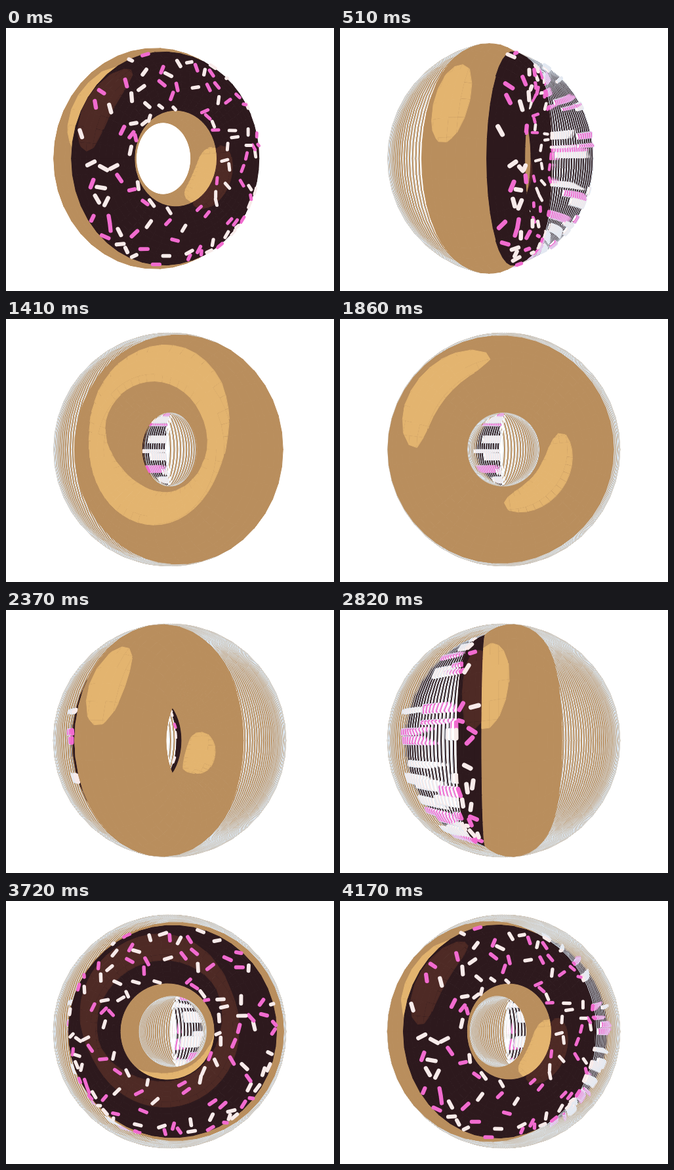
Animation, 500 px wide and 400 px high, one loop 4230 ms. Source, as an HTML page with a canvas:

```html
<!DOCTYPE html>
<html lang="en">
<head>
<meta charset="utf-8">
<title>Spinning donut</title>
<style>
html, body { margin: 0; width: 100%; height: 100%; overflow: hidden; background: #fff; }
canvas { display: block; }
</style>
</head>
<body>
<canvas id="stage" width="500" height="400"></canvas>
<script>
const W = 500, H = 400, CX = 249.5, CY = 198.5, CAM = 483;
const FRAMES = 140, STEP = 30, LOOP = 4230, START = 29.6;
const RING = 111, BACK = 10, LIGHT = [-130, 142, 302], LIT = 0.846;
const DOUGH = { r: 55, z: 0, from: 48.5, to: 311.5, rows: 24, base: '#b98e5d', lit: '#e3b46f' };
const ICING = { r: 43.2, z: 24, from: -73, to: 73, rows: 14, base: '#2d191d', lit: '#4e2a25' };
const SEGMENTS = 48, HALO = '#dce9f5';
const SPRINKLES = 120, GAP = 10, WHITE = '#f8ebea', PINK = '#f16bcf';

const rad = d => d * Math.PI / 180;
const angleAt = k => rad(START + k * 360 / FRAMES);
const dot = (a, b) => a[0] * b[0] + a[1] * b[1] + a[2] * b[2];
const along = (a, b, s) => a.map((v, i) => v + b[i] * s);
const unit = v => along([0, 0, 0], v, 1 / Math.hypot(...v));
function turn([x, y, z], a) {
  const c = Math.cos(a), s = Math.sin(a);
  return [x * c + z * s, y, z * c - x * s];
}
function project([x, y, z]) {
  const s = CAM / (CAM - z);
  return [CX + x * s, CY - y * s, s];
}
const toEye = p => [-p[0], -p[1], CAM - p[2]];

// Point and normal at angle f around the ring and t around the tube
function surface(part, f, t) {
  const out = Math.sin(t);
  const n = [out * Math.cos(f), out * Math.sin(f), Math.cos(t)];
  const core = [RING * Math.cos(f), RING * Math.sin(f), part.z - BACK];
  return { n, p: along(core, n, part.r) };
}

// The donut is a dough arc closed by an icing arc, turned around the axis
function buildPart(part) {
  const grid = [];
  for (let j = 0; j <= part.rows; j++) {
    const t = rad(part.from + (part.to - part.from) * j / part.rows);
    const row = [];
    for (let i = 0; i < SEGMENTS; i++) row.push(surface(part, 2 * Math.PI * i / SEGMENTS, t));
    grid.push(row);
  }
  return { part, grid };
}

let seed = 7;
function random() {
  seed = (seed * 16807) % 2147483647;
  return seed / 2147483647;
}

// Scatter evenly over the icing, keeping a small gap
function scatter() {
  const list = [];
  while (list.length < SPRINKLES) {
    const f = random() * 2 * Math.PI, t = rad(random() * 130 - 65), spin = random() * Math.PI;
    const density = (RING + ICING.r * Math.sin(t)) / (RING + ICING.r);
    const { p, n } = surface(ICING, f, t);
    const crowded = list.some(s => Math.hypot(...along(s.p, p, -1)) < GAP);
    if (crowded || random() > density) continue;
    const around = [-Math.sin(f), Math.cos(f), 0];
    const across = [Math.cos(t) * Math.cos(f), Math.cos(t) * Math.sin(f), -Math.sin(t)];
    const dir = along(along([0, 0, 0], around, Math.cos(spin)), across, Math.sin(spin));
    list.push({ p: along(p, n, 0.8), n, dir, color: random() < 0.53 ? WHITE : PINK });
  }
  return list;
}

const parts = [DOUGH, ICING].map(buildPart);
const sprinkles = scatter();

function layer() {
  const c = document.createElement('canvas');
  c.width = W;
  c.height = H;
  return c.getContext('2d');
}
const stage = document.getElementById('stage').getContext('2d');
const pic = layer(), shape = layer();
pic.lineJoin = pic.lineCap = 'round';

function fillPoly(pts, color) {
  pic.beginPath();
  pts.forEach(v => pic.lineTo(v.s[0], v.s[1]));
  pic.closePath();
  pic.fillStyle = pic.strokeStyle = color;
  pic.lineWidth = 1;
  pic.fill();
  pic.stroke();
}

// Part of a face brighter than the threshold
function litPart(face) {
  const out = [];
  face.forEach((a, i) => {
    const b = face[(i + 1) % face.length];
    if (a.g > 0) out.push(a);
    if (a.g > 0 !== b.g > 0) {
      const t = a.g / (a.g - b.g);
      out.push({ s: [a.s[0] + (b.s[0] - a.s[0]) * t, a.s[1] + (b.s[1] - a.s[1]) * t] });
    }
  });
  return out;
}

function drawFace(face, part) {
  const lit = litPart(face);
  if (face.some(v => v.g <= 0)) fillPoly(face, part.base);
  if (lit.length > 2) fillPoly(lit, part.lit);
}

function drawSprinkle({ dir, color }, at, a) {
  const d = turn(dir, a), [x1, y1, s] = project(along(at, d, -4.8)), [x2, y2] = project(along(at, d, 4.8));
  pic.beginPath();
  pic.moveTo(x1, y1);
  pic.lineTo(x2 + 0.01, y2);
  pic.lineWidth = 5 * s;
  pic.strokeStyle = color;
  pic.stroke();
}

function drawDonut(k) {
  const a = angleAt(k), items = [];
  for (const { part, grid } of parts) {
    const rows = grid.map(row => row.map(v => {
      const p = turn(v.p, a), n = turn(v.n, a);
      const g = dot(n, unit(along(LIGHT, p, -1))) - LIT;
      return { s: project(p), g, far: Math.hypot(...toEye(p)) };
    }));
    for (let j = 0; j < part.rows; j++) for (let i = 0; i < SEGMENTS; i++) {
      const m = (i + 1) % SEGMENTS;
      const face = [rows[j][i], rows[j][m], rows[j + 1][m], rows[j + 1][i]];
      const [p, q, r, s] = face.map(v => v.s);
      const area = (r[0] - p[0]) * (s[1] - q[1]) - (r[1] - p[1]) * (s[0] - q[0]);
      if (area <= 0) continue;
      const far = face.reduce((sum, v) => sum + v.far, 0) / 4;
      items.push({ far, draw: () => drawFace(face, part) });
    }
  }
  for (const sprinkle of sprinkles) {
    const at = turn(sprinkle.p, a), eye = toEye(at);
    if (dot(turn(sprinkle.n, a), unit(eye)) < -0.06) continue;
    items.push({ far: Math.hypot(...eye) - 13, draw: () => drawSprinkle(sprinkle, at, a) });
  }
  pic.clearRect(0, 0, W, H);
  items.sort((u, v) => v.far - u.far).forEach(item => item.draw());
}

// Stamp the last picture, shrunk by whole pixels, optionally in one colour
function stamp(inset, color) {
  shape.globalCompositeOperation = 'copy';
  shape.drawImage(pic.canvas, 0, 0);
  shape.globalCompositeOperation = 'destination-in';
  if (inset) for (const [x, y] of [[1, 0], [-1, 0], [0, 1], [0, -1]])
    shape.drawImage(pic.canvas, x * inset, y * inset);
  if (color) {
    shape.globalCompositeOperation = 'source-in';
    shape.fillStyle = color;
    shape.fillRect(0, 0, W, H);
  }
  stage.drawImage(shape.canvas, 0, 0);
}

let shown = -1;
function showFrame(k) {
  if (k === 0) {
    stage.fillStyle = '#fff';
    stage.fillRect(0, 0, W, H);
  } else {
    // Each pose leaves its rim behind
    stamp(0, HALO);
    stamp(1);
    stamp(3, '#fff');
  }
  drawDonut(k);
  stage.drawImage(pic.canvas, 0, 0);
  shown = k;
}

const begun = performance.now();
function tick() {
  const t = (performance.now() - begun) % LOOP;
  const k = Math.min(FRAMES - 1, Math.floor(t / STEP));
  if (k < shown) shown = -1;
  while (shown < k) showFrame(shown + 1);
  requestAnimationFrame(tick);
}
tick();
</script>
</body>
</html>
```
